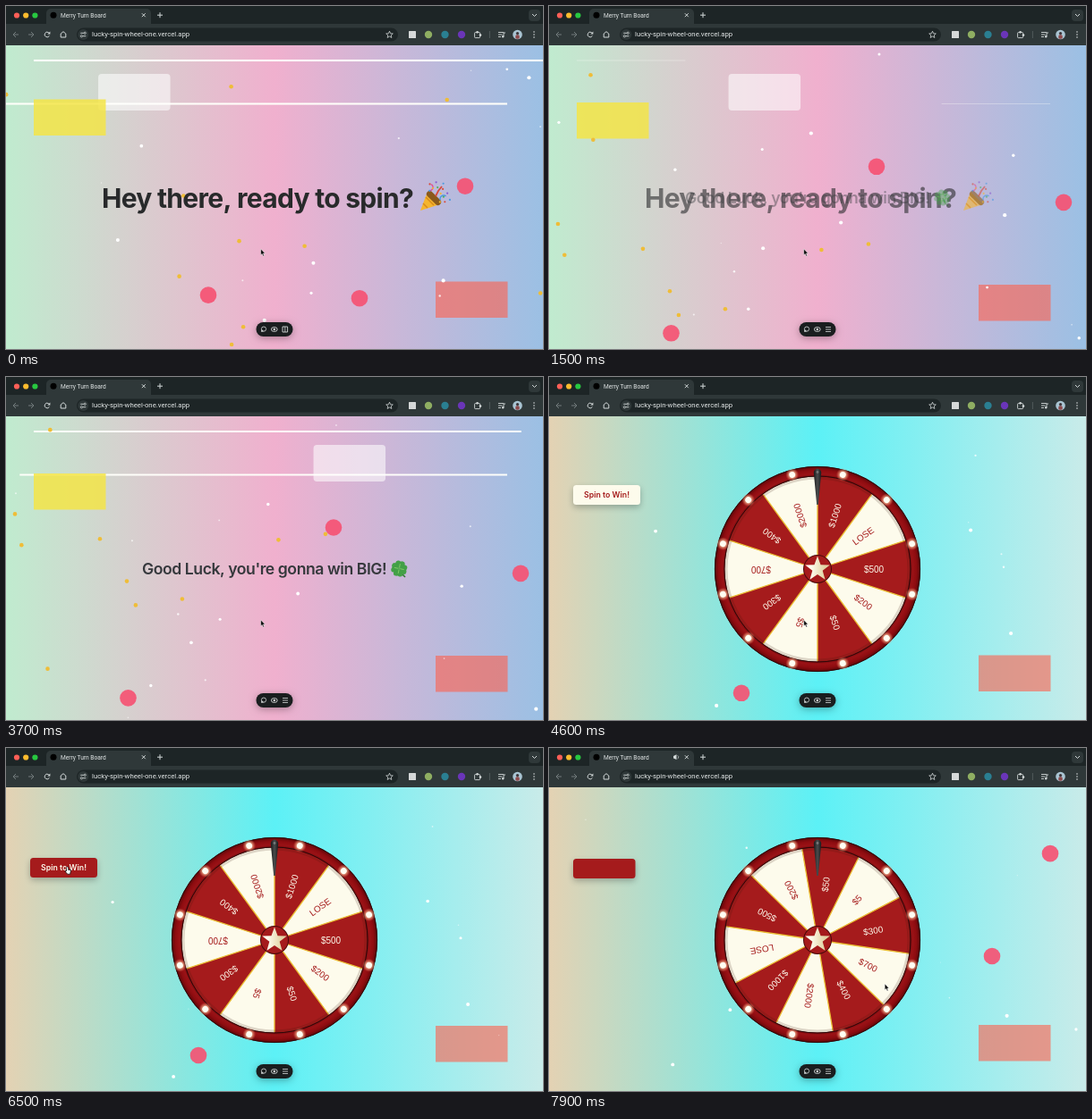
An HTML page with a canvas for the animation above (8 s loop, 600 by 384 pixels).

```html
<!DOCTYPE html>
<html lang="en">
<head>
<meta charset="utf-8">
<title>Merry Turn Board</title>
<style>
html, body { margin: 0; width: 100%; height: 100%; overflow: hidden; background: #1d2526; }
canvas { display: block; width: 600px; height: 384px; }
</style>
</head>
<body>
<canvas id="stage"></canvas>
<script>
const canvas = document.getElementById('stage');
const c = canvas.getContext('2d');
const dpr = window.devicePixelRatio || 1;
canvas.width = 600 * dpr;
canvas.height = 384 * dpr;

// Times in seconds
const LOOP = 8, LUCK = 1.3, WHEEL = 4.3, SPIN = 6.8;
const TAU = Math.PI * 2, DEG = Math.PI / 180, TOP = 44, HEIGHT = 340;
const RED = '#a51b1c', CREAM = '#fdfbec';
const PRIZES = ['$1000', 'LOSE', '$500', '$200', '$50', '$5', '$300', '$700', '$400', '$2000'];

const clamp = v => Math.min(1, Math.max(0, v));
const ease = v => (v = clamp(v), v * v * (3 - 2 * v));
const wave = (t, peak, period) => Math.cos(TAU * (t - peak) / period);
const random = seed => () => {
  const v = Math.sin(seed++ * 12.9898) * 43758.5453;
  return v - Math.floor(v);
};

function blend(g, colors) {
  colors.forEach((color, i) => g.addColorStop(i / (colors.length - 1), color));
  return g;
}
const linear = (x0, x1, ...colors) => blend(c.createLinearGradient(x0, 0, x1, 0), colors);
const radial = (x, y, r0, r1, ...colors) => blend(c.createRadialGradient(x, y, r0, x, y, r1), colors);

function disc(x, y, r, fill) {
  c.fillStyle = fill;
  c.beginPath();
  c.arc(x, y, r, 0, TAU);
  c.fill();
}
function ring(x, y, r, stroke, width = 1, from = 0, to = TAU) {
  c.strokeStyle = stroke;
  c.lineWidth = width;
  c.beginPath();
  c.arc(x, y, r, from, to);
  c.stroke();
}
function box(x, y, w, h, r, fill, stroke) {
  c.beginPath();
  c.roundRect(x, y, w, h, r);
  if (fill) { c.fillStyle = fill; c.fill(); }
  if (stroke) { c.strokeStyle = stroke; c.lineWidth = 0.9; c.stroke(); }
}
function poly(points, fill, stroke, width = 1, open) {
  c.beginPath();
  for (let i = 0; i < points.length; i += 2) c.lineTo(points[i], points[i + 1]);
  if (!open) c.closePath();
  if (fill) { c.fillStyle = fill; c.fill(); }
  if (stroke) { c.strokeStyle = stroke; c.lineWidth = width; c.stroke(); }
}
const line = (stroke, width, ...points) => poly(points, null, stroke, width, true);
function label(text, x, y, font, fill, align = 'left', spacing = 0) {
  c.font = font;
  c.fillStyle = fill;
  c.textAlign = align;
  c.letterSpacing = spacing + 'px';
  c.fillText(text, x, y);
}
function at(x, y, angle, draw) {
  c.save();
  c.translate(x, y);
  c.rotate(angle);
  draw();
  c.restore();
}
function shadow(blur, drop, color, draw) {
  c.save();
  c.shadowColor = color;
  c.shadowBlur = blur * dpr;
  c.shadowOffsetY = drop * dpr;
  draw();
  c.restore();
}
function star(x, y, r, inner) {
  return Array.from({ length: 10 }, (_, i) => {
    const a = i * Math.PI / 5, k = i % 2 ? inner : r;
    return [x + k * Math.sin(a), y - k * Math.cos(a)];
  }).flat();
}

// Seeded dots that swell and fade in place
function twinkles(t, seed, count) {
  const rnd = random(seed);
  for (let i = 0; i < count; i++) {
    const x = 600 * rnd(), y = TOP + HEIGHT * rnd();
    const s = (0.5 + 0.5 * wave(t, 2 * rnd(), 2)) ** 2;
    if (s > 0.05) disc(x, y, 0.5 + 1.6 * s, `rgba(255,255,255,${clamp(0.35 + s)})`);
  }
}
// Seeded drops, one screen height in three seconds
function confetti(t, seed) {
  const rnd = random(seed);
  for (let i = 0; i < 10; i++) {
    disc(600 * rnd(), TOP + HEIGHT * ((rnd() + t / 3) % 1), 2.3, '#efbd38');
  }
}
function balls(t, ...spots) {
  spots.forEach(([x, y], i) => disc(x, y + 8 * wave(t, 1.1 + 0.3 * i, 3), 9.3, 'rgba(245,82,115,.92)'));
}
function block(t, x, y, fill) {
  box(x, y + 2.7 * wave(t, 1.1, 3), 80.5, 40.5, 0, fill);
}
function backdrop(...colors) {
  c.fillStyle = linear(0, 600, ...colors);
  c.fillRect(0, TOP, 600, HEIGHT);
}

function popper() {
  const colors = ['#4a9be0', '#d94b3c', '#f0b92e', '#8a5bd0', '#50b060'];
  poly([463, 229, 471, 208, 485, 222], '#f5b52e');
  line('#d98b1c', 1.6, 466, 221, 471, 226);
  line('#d98b1c', 1.6, 469, 214, 478, 223);
  at(478, 215, Math.PI / 4, () => box(-10, -3.5, 20, 7, 3.5, '#8a5a1c'));
  ring(473, 203, 4, '#e0539a', 1.6, -1, 1.5);
  ring(489, 216, 4, '#4a9be0', 1.6, 2.8, 5.4);
  line('#d94b3c', 1.8, 480, 213, 483, 207, 487, 202);
  for (let i = 0; i < 13; i++) {
    const a = -2 + i * 0.21, r = 9 + i * 7 % 12;
    disc(477 + r * Math.cos(a), 215 + r * Math.sin(a), 1.1, colors[i % 5]);
  }
}
function clover() {
  line('#2f7d32', 1.6, 440, 215, 442, 220, 446, 224);
  for (let i = 0; i < 4; i++) at(439.3, 214.5, 0.2 + i * Math.PI / 2, () => {
    disc(-2.2, -5.6, 3.1, '#43a047');
    disc(2.2, -5.6, 3.1, '#43a047');
    poly([-4.8, -4, 4.8, -4, 0, 0], '#43a047');
    line('#8bcf6a', 0.8, 0, -1, 0, -5.5);
  });
}

function bars(t) {
  const s = 0.5 - 0.5 * wave(t, 2.12, 4), length = Math.max(0, 625 * s - 15), h = 0.5 + 1.6 * s;
  c.fillStyle = `rgba(255,255,250,${clamp(0.15 + s)})`;
  c.fillRect(31, 61 - h / 2, length, h);
  c.fillRect(560 - length, 109.5 - h / 2, length, h);
}

function welcome(t) {
  const swap = clamp((t - LUCK) / 0.5), first = t < LUCK;
  backdrop('#c0ebcf', '#f0b0ce', '#9bc0e4');
  bars(t);
  box(103 + 65 * t, 76, 80.5, 41, 4, 'rgba(255,255,255,.57)');
  block(t, 31, 106.2, 'rgba(245,229,70,.84)');
  block(t, 480, 310.2, 'rgba(255,95,75,.6)');
  if (first) balls(t, [226, 329], [395, 335], [513, 209]);
  else balls(t, [575, 214.5], [136.5, 358.5], [366, 172.5]);
  confetti(t, first ? 11 : 57);
  twinkles(t, first ? 101 : 203, 22);

  c.globalAlpha = 1 - swap;
  label('Hey there, ready to spin?', 107, 226, '700 30px Inter, sans-serif', '#282a2b', 'left', -0.72);
  popper();
  c.globalAlpha = swap;
  label("Good Luck, you're gonna win BIG!", 152, 221.3, '600 17.6px Inter, sans-serif', '#35383c', 'left', -0.44);
  clover();
  c.globalAlpha = 1;
}

function sectors() {
  const step = TAU / PRIZES.length;
  PRIZES.forEach((prize, i) => at(0, 0, (i + 0.5) * step - Math.PI / 2, () => {
    c.fillStyle = i % 2 ? CREAM : RED;
    c.beginPath();
    c.moveTo(0, 0);
    c.arc(0, 0, 103.5, -step / 2, step / 2);
    c.fill();
    label(prize, 63, 3.5, '10px "Liberation Sans", Arial, sans-serif', i % 2 ? RED : CREAM, 'center');
  }));
  PRIZES.forEach((_, i) => at(0, 0, i * step - Math.PI / 2, () => line('#ecc035', 1.3, 0, 0, 103, 0)));
}

function wheel(t) {
  const turn = 206 * DEG * Math.max(0, (t - SPIN) / 1.1) ** 2.2;
  at(300, 215, 0, () => {
    disc(0, 0, 115, radial(0, 0, 102, 115, '#62090b', '#9b1216', '#8d0c10', '#5b0608'));
    ring(0, 0, 114.6, '#2b0506');
    at(0, 0, turn, sectors);
    ring(0, 0, 102, 'rgba(60,20,10,.16)', 3);
    ring(0, 0, 104, '#2b0708');

    for (let i = 0; i < 12; i++) at(0, 0, (15 + 30 * i) * DEG, () => {
      disc(0, -109.3, 7.5, radial(0, -109.3, 2, 7.5, 'rgba(255,235,205,.95)', 'rgba(250,180,140,.5)', 'rgba(240,110,90,0)'));
      disc(0, -109.3, 3.4, '#fffdf2');
    });

    disc(0, 0, 16, '#4a0a0b');
    disc(0, 0, 15, RED);
    poly(star(0, 0, 14.5, 6), linear(-8, 8, '#fffdf0', '#e2d3a4'));

    const steel = linear(-4, 4, '#1b1d1e', '#4a4c4d', '#1b1d1e');
    disc(0, -108, 4.2, steel);
    poly([-4.2, -108, 4.2, -108, 0.8, -72, -0.8, -72], steel);
    disc(0, -108.5, 1.4, '#77797a');
  });
}

function spinButton(t) {
  const hover = ease((t - 5.95) / 0.2), pressed = t >= SPIN;
  const y = 121 + 2 * hover + pressed;
  const [face, ink] = hover > 0.5 ? [RED, CREAM] : [CREAM, RED];
  shadow(7, 3, 'rgba(30,40,40,.3)', () => box(27, y, pressed ? 69.5 : 75, 22, 3.5, face));
  if (!pressed) label('Spin to Win!', 64.5, y + 14.2, '600 8.75px Inter, sans-serif', ink, 'center');
}

function game(t) {
  backdrop('#e4d2b3', '#5cf1f6', '#c9ebe9');
  block(t, 480, 310.2, 'rgba(255,95,75,.6)');
  if (t < SPIN) balls(t, [300, 215], [215, 346.5]);
  else balls(t, [560, 119], [495, 229]);
  twinkles(t, t < SPIN ? 307 : 401, 20);
  wheel(t);
  spinButton(t);
}

function tabStrip(t, ink, bar) {
  box(45, 3, 117, 20, [5, 5, 0, 0], bar);
  ['#fe5f57', '#febc2e', '#28c840'].forEach((color, i) => disc(12 + 10.2 * i, 10.5, 3.1, color));
  disc(53, 10.2, 3.5, '#000');
  label('Merry Turn Board', 61, 12.7, '6.6px Roboto, sans-serif', '#e4e8e8');
  if (t >= SPIN + 0.1) {
    poly([139, 9, 142.5, 7.3, 142.5, 13, 139, 11.4], ink);
    ring(142.5, 10.2, 2.2, ink, 0.7, -1, 1);
  }
  at(153.8, 10.2, Math.PI / 4, () => {
    line(ink, 0.9, -2.8, 0, 2.8, 0);
    line(ink, 0.9, 0, -2.8, 0, 2.8);
  });
  line(ink, 1, 169, 10.2, 175, 10.2);
  line(ink, 1, 172, 7.2, 172, 13.2);
  box(584, 4, 13, 13, 4, bar);
  line(ink, 1, 588, 9, 590.5, 11.5, 593, 9);
}

function toolbar(ink, bar, dark) {
  const arrow = () => {
    line('#727b7c', 1, -3, 0, 3, 0);
    line('#727b7c', 1, 0, -3, 3, 0, 0, 3);
  };
  at(11, 32, Math.PI, arrow);
  at(28, 32, 0, arrow);
  ring(46, 32, 2.8, ink, 1, 0.5, 5.6);
  poly([49.4, 28.6, 49.4, 31.6, 46.4, 31.6], ink);
  poly([61.2, 31, 64, 28.7, 66.8, 31, 66.8, 35, 61.2, 35], null, ink);

  box(79, 24.5, 359, 15, 7.5, dark);
  disc(86.3, 32, 6, bar);
  for (const angle of [0, Math.PI]) at(86.3, 32, angle, () => {
    line(ink, 0.9, -3, -1.7, 0.5, -1.7);
    ring(1.9, -1.7, 1.1, ink, 0.8);
  });
  label('lucky-spin-wheel-one.vercel.app', 96, 34.4, '7.75px Roboto, sans-serif', '#e4e8e8');
  poly(star(428.5, 32.2, 4, 1.8), null, ink, 0.8);

  box(450, 28, 8, 8, 0.5, '#d5d8d8');
  ['#8fae62', '#2a7f92', '#6a35b8'].forEach((color, i) => disc(472 + 18.5 * i, 32, 4.2, color));
  box(523.6, 29.6, 6, 6, 0.8, null, ink);
  disc(526.6, 29.2, 1.3, ink);
  disc(530, 32.6, 1.3, ink);
  line('#5b6465', 0.8, 540.4, 28, 540.4, 36);
  for (let i = 0; i < 3; i++) {
    line(ink, 0.9, 550, 29.5 + 2.5 * i, 556 - 1.5 * i, 29.5 + 2.5 * i);
    disc(590, 29 + 3 * i, 0.8, ink);
  }
  line(ink, 0.9, 558, 30, 556, 30, 556, 34);
  disc(555.2, 34.2, 1.2, ink);
  disc(571.5, 32, 5.3, '#a9c4d2');
  disc(571.5, 30.6, 1.6, '#3b3438');
  box(569.3, 32.2, 4.4, 4.6, 1.6, '#8d4a4c');
}

function browser(t) {
  const ink = '#d3d9d9', bar = '#2f3839', dark = '#1d2526';
  box(0, 0, 600, 21, 0, dark);
  box(0, 20, 600, 24, 0, bar);
  tabStrip(t, ink, bar);
  toolbar(ink, bar, dark);
}

function dock(t) {
  const ink = '#d5d9d9';
  shadow(8, 2, 'rgba(0,0,0,.3)', () => box(279.5, 354, 41, 16, 8, '#1a1e1f'));
  ring(288, 361.6, 2.6, ink, 0.8);
  poly([285.4, 362, 285.2, 365, 288, 364.3], ink);
  box(296.5, 359.7, 6.6, 4.6, 2.3, null, ink);
  disc(299.8, 362, 1.2, ink);
  if (t < 3 && Math.floor(t) % 2 === 0) {
    box(309, 359, 5.6, 6, 0, null, ink);
    line(ink, 0.8, 311.8, 359, 311.8, 365);
  } else {
    for (let y = 359.5; y < 365; y += 2.5) line(ink, 0.8, 309, y, 315, y);
  }
}

function pointer(t) {
  const go = ease((t - 5.2) / 1), back = ease((t - 6.95) / 0.75);
  at(284.7 - 217 * go + 307.5 * back, 272 - 139 * go + 131 * back, 0, () => {
    if (go > 0.95 && back < 0.04) {
      box(0, 0, 1.8, 5, 0.9, '#fff', '#111');
      poly([-1.8, 5, 0, 4.6, 0, 3, 4.8, 3.6, 4, 8.2, 1, 8.2], '#fff', '#111', 0.8);
      box(0.3, 0.4, 1.2, 5, 0.6, '#fff');
    } else {
      poly([0, 0, 0, 6.8, 1.5, 5.4, 2.7, 8, 3.8, 7.5, 2.7, 5, 4.7, 5], '#000', '#fff', 0.5);
    }
  });
}

const begin = performance.now();
function frame() {
  const t = (performance.now() - begin) / 1000 % LOOP;
  c.setTransform(dpr, 0, 0, dpr, 0, 0);
  (t < WHEEL ? welcome : game)(t);
  browser(t);
  dock(t);
  pointer(t);
  requestAnimationFrame(frame);
}
requestAnimationFrame(frame);
</script>
</body>
</html>
```
